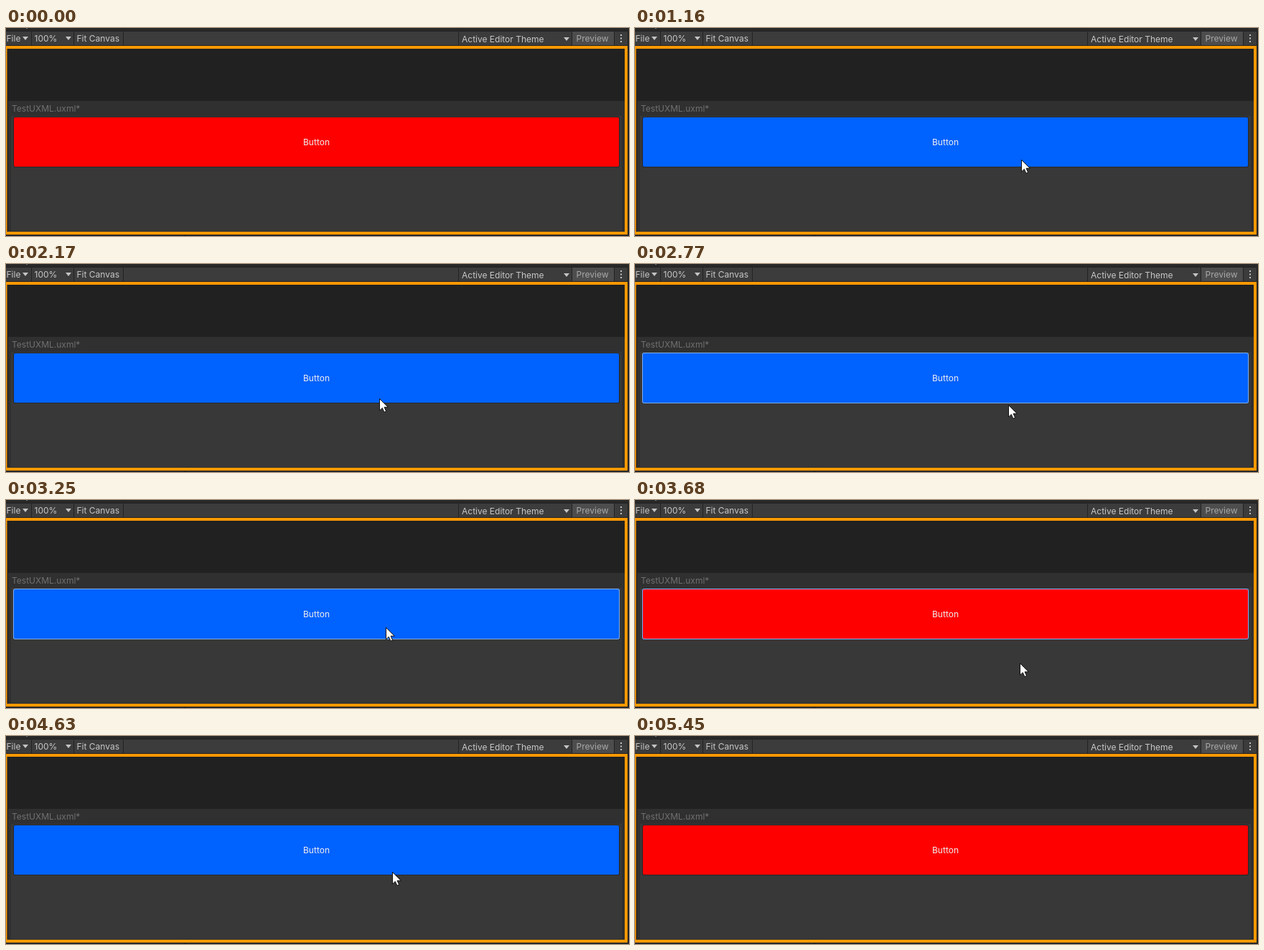
An HTML page that plays this animation: 868x291 px, repeating every 5780 ms.

```html
<!DOCTYPE html>
<html lang="en">
<head>
<meta charset="utf-8">
<title>Button states</title>
<style>
  html, body { margin: 0; width: 100%; height: 100%; overflow: hidden; background: #282828; }
  svg { display: block; width: 868px; height: 291px; }
  text { font: 12px Inter, Roboto, sans-serif; fill: #c8c8c8; }
  .sep { fill: #232323; }
  .arrow { fill: #c4c4c4; }
</style>
</head>
<body>
<svg viewBox="0 0 868 291">
  <!-- toolbar -->
  <rect width="868" height="291" fill="#282828"/>
  <rect x="28" width="2" height="1" fill="#777"/>
  <rect y="4" width="868" height="21" fill="#3c3c3c"/>
  <rect x="789" y="4" width="58" height="20" fill="#4d4d4d"/>
  <g class="sep">
    <rect y="4" width="868" height="1"/>
    <rect y="24" width="868" height="1"/>
    <rect x="35" y="4" width="1" height="21"/>
    <rect x="94" y="4" width="1" height="21"/>
    <rect x="163" y="4" width="1" height="21"/>
    <rect x="630" y="4" width="1" height="21"/>
    <rect x="788" y="4" width="1" height="21"/>
    <rect x="847" y="4" width="1" height="21"/>
    <rect x="866" y="4" width="2" height="287"/>
  </g>
  <text x="0.5" y="19">File</text>
  <text x="39.5" y="19">100%</text>
  <text x="98.5" y="19">Fit Canvas</text>
  <text x="635" y="20">Active Editor Theme</text>
  <text x="794.5" y="19" style="fill:#a9a9a9">Preview</text>
  <g class="arrow">
    <path d="M23 12h8l-4 5z"/>
    <path d="M83 12h8l-4 5z"/>
    <path d="M777 13h8l-4 5z"/>
    <path d="M856 9h2v2h-2zM856 13.5h2v2h-2zM856 18h2v2h-2z"/>
  </g>

  <!-- viewport and canvas -->
  <rect y="25" width="866" height="264" fill="#ff9900"/>
  <rect x="1.5" y="29" width="860.5" height="256" fill="#212121"/>
  <rect x="3" y="102" width="859" height="183" fill="#303030"/>
  <rect x="7" y="123" width="851" height="161" fill="#383838"/>
  <rect x="249" y="290" width="2" height="1" fill="#151515"/>
  <text x="8" y="117" style="fill:#707070">TestUXML.uxml*</text>

  <rect id="frame" x="10" y="124" width="845" height="71" rx="3"/>
  <rect id="fill" x="11" y="125" width="843" height="69" rx="2"/>
  <text x="432.5" y="164" text-anchor="middle" style="fill:#eee">Button</text>

  <g id="cursor">
    <circle id="press" cx="-1" cy="-1" r="12" fill="#fff000" fill-opacity=".5"/>
    <path d="M.5 .5V17L4.3 13.4 6.9 19.3 9.6 18.1 7.1 12.3H12.2Z" fill="#fff" stroke="#111" stroke-width="1"/>
  </g>
</svg>
<script>
const LOOP = 5780;
const [frame, fill, cursor, press] =
  ["frame", "fill", "cursor", "press"].map(id => document.getElementById(id));

// Pointer moves: start, end, number of steps, path of the arrow tip
const moves = [
  [200, 490, 5, [[692, 278], [640, 262], [590, 245], [560, 238], [553, 236]]],
  [760, 890, 3, [[550, 224], [541, 178]]],
  [1160, 1290, 3, [[538, 184], [537, 229]]],
  [1490, 1630, 3, [[535, 217], [527, 164]]],
  [1830, 2370, 8, [[525, 168], [523, 200], [522, 223], [521, 212],
                   [520, 188], [520, 172], [521, 168], [521, 168]]],
  [2770, 2910, 3, [[520, 197], [524, 240]]],
  [3110, 3250, 3, [[526, 230], [529, 178]]],
  [3400, 3960, 9, [[531, 190], [534, 222], [536, 228], [538, 222], [537, 216]]],
  [4160, 4430, 4, [[537, 216], [537, 178]]],
  [4630, 4770, 3, [[538, 190], [539, 220]]],
  [5100, 5380, 5, [[548, 224], [610, 242], [690, 260], [765, 274], [822, 285]]]
];

function along(path, u) {
  const s = u * (path.length - 1);
  const i = Math.min(Math.floor(s), path.length - 2);
  return path[i].map((a, k) => Math.round(a + (path[i + 1][k] - a) * (s - i)));
}

const steps = moves.flatMap(([start, end, count, path]) =>
  Array.from({ length: count }, (_, k) => {
    const u = k / (count - 1);
    return { time: Math.floor((start + (end - start) * u) / 10) * 10, tip: along(path, u) };
  }));

const within = (t, from, to) => t >= from && t < to;

function draw(t) {
  const visible = within(t, 200, 5450);
  const [x, y] = (steps.findLast(s => s.time <= t) || steps[0]).tip;
  const hover = visible && y < 199;
  const focus = within(t, 2370, 4090);
  const down = within(t, 2370, 2440) || within(t, 4090, 4160);

  cursor.setAttribute("visibility", visible ? "visible" : "hidden");
  cursor.setAttribute("transform", `translate(${x} ${y})`);
  press.setAttribute("display", down ? "inline" : "none");
  fill.setAttribute("fill", hover ? "#0062ff" : "#ff0000");
  frame.setAttribute("fill", focus ? "#7baefa" : "#272727");
}

const begin = performance.now();
function tick() {
  draw((performance.now() - begin) % LOOP);
  requestAnimationFrame(tick);
}
tick();
</script>
</body>
</html>
```
